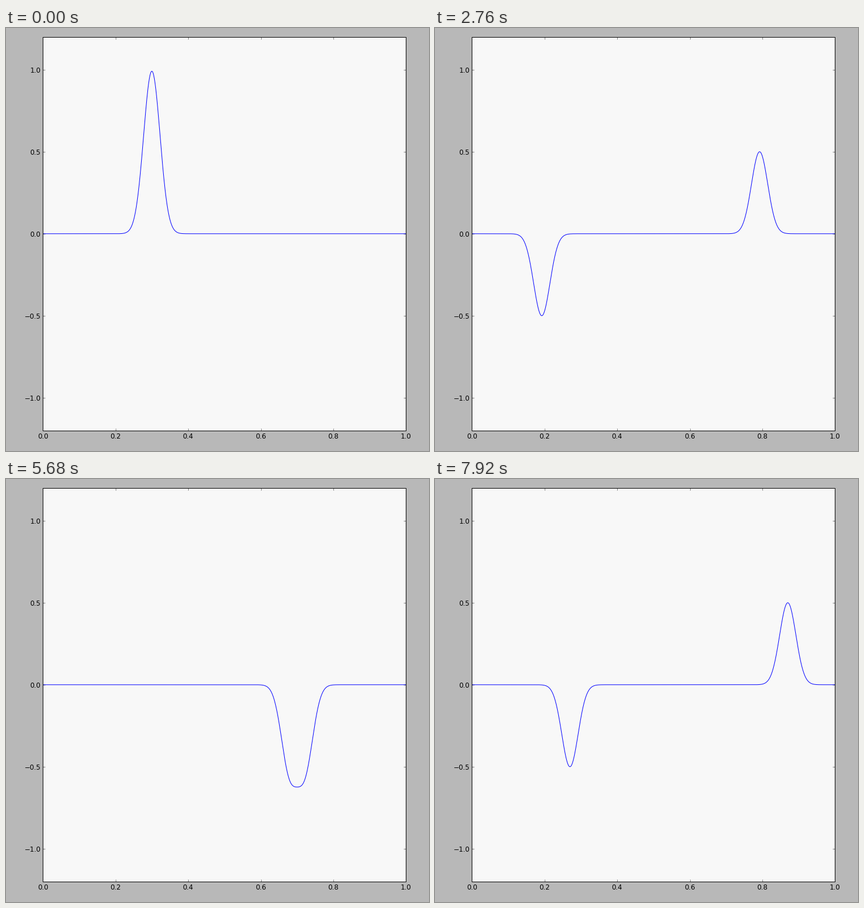
Recreate the animation shown at these times as a matplotlib script. Size 748x748 px, loop 8000 ms.

```python
import numpy as np
import matplotlib
import matplotlib.pyplot as plt
from matplotlib.animation import FuncAnimation

SIZE, DPI = 748, 72
TICK_MS, LOOP_MS = 40, 8000
LEFT, RIGHT, TOP, BOTTOM = 65.3, 707.3, 15.8, 711.8

matplotlib.rcParams["font.family"] = "DejaVu Sans"
matplotlib.rcParams["font.size"] = 12

# Moments at which a new picture appears; a few steps are longer or shorter.
STEPS = np.concatenate([
    np.arange(0, 2241, 80),
    np.arange(2360, 4521, 80),
    np.arange(4640, 7681, 80),
    [7720, 7800, 7880, 7920],
])

# Distance travelled by each half of the pulse against time.
TIMES = [0, 880, 1920, 3560, 4720, 5560, 6560, 7920]
TRAVEL = [0.003, 0.155, 0.3406, 0.637, 0.845, 1.0, 1.181, 1.430]

START = 0.3
x = np.linspace(0, 1, 1001)


def pulse(center):
    return 0.5 * np.exp(-1000 * (x - center) ** 2)


def wave(shift):
    """String with both ends fixed: odd images of period 2."""
    y = np.zeros_like(x)
    for image in (-2, 0, 2):
        for move in (-shift, shift):
            y += pulse(image + START + move)
            y -= pulse(image - START - move)
    return y


fig = plt.figure(figsize=(SIZE / DPI, SIZE / DPI), dpi=DPI, facecolor="#b8b8b8")
ax = fig.add_axes([LEFT / SIZE, 1 - BOTTOM / SIZE,
                   (RIGHT - LEFT) / SIZE, (BOTTOM - TOP) / SIZE],
                  facecolor="#f8f8f8")
ax.set_xlim(0, 1)
ax.set_ylim(-1.2, 1.2)
ax.set_xticks(np.arange(0, 1.1, 0.2))
ax.set_yticks(np.arange(-1, 1.1, 0.5))
ax.tick_params(direction="in", length=4, width=0.5, pad=4, top=True, right=True)
for spine in ax.spines.values():
    spine.set_linewidth(1)

line, = ax.plot(x, wave(TRAVEL[0]), color="#0000ff", lw=1)


def update(frame):
    step = STEPS[np.searchsorted(STEPS, frame * TICK_MS, side="right") - 1]
    line.set_ydata(wave(np.interp(step, TIMES, TRAVEL)))
    return line,


anim = FuncAnimation(fig, update, frames=LOOP_MS // TICK_MS,
                     interval=TICK_MS, repeat=True, repeat_delay=0)
plt.show()
```
